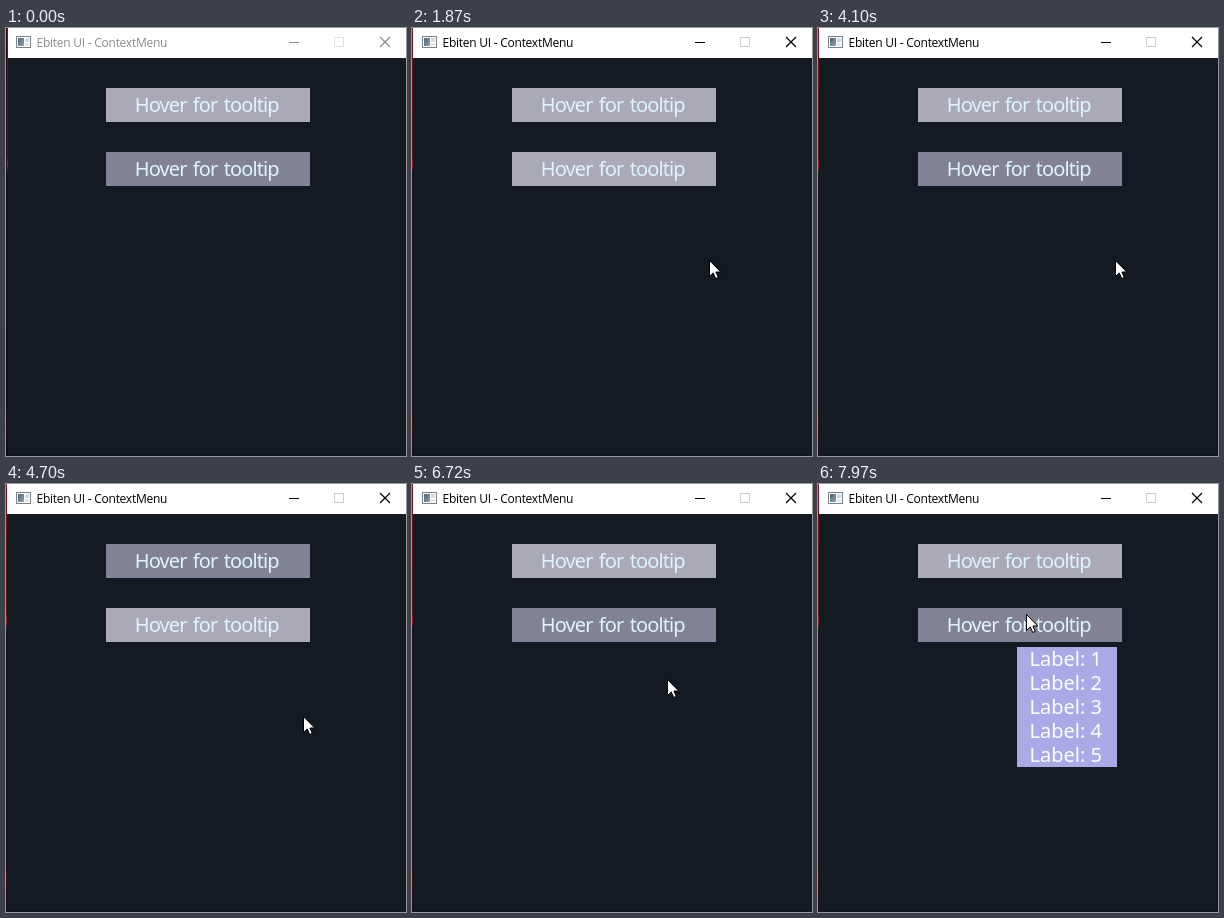
An HTML page for the animation above (7.99 s loop, 400 px wide and 428 px high).

```html
<!DOCTYPE html>
<html lang="en">
<head>
<meta charset="utf-8">
<title>Context menu</title>
<style>
  html, body { margin: 0; width: 100%; height: 100%; overflow: hidden; background: #131a22; }
  svg { display: block; width: 400px; height: 428px; }
  text { white-space: pre; }
  .title { font: 12px "Open Sans", sans-serif; letter-spacing: -.25px; }
  .button, .tip { font: 500 20px "Noto Sans", sans-serif; }
  .button { fill: #dff4ff; letter-spacing: -.9px; word-spacing: 2px; }
  .tip { fill: #fff; }
</style>
</head>
<body>
<svg viewBox="0 0 400 428">
  <defs>
    <linearGradient id="edge" x2="0" y2="1">
      <stop offset="0" stop-color="#7c0c18"/>
      <stop offset=".3" stop-color="#6a0a14"/>
      <stop offset=".32" stop-color="#98202c"/>
      <stop offset=".34" stop-color="#1c1416"/>
      <stop offset=".88" stop-color="#1a1214"/>
      <stop offset=".92" stop-color="#4c0a12"/>
      <stop offset="1" stop-color="#120c10"/>
    </linearGradient>
    <linearGradient id="panel" x2="1" y2="1">
      <stop offset="0" stop-color="#4a6478"/>
      <stop offset="1" stop-color="#8fa5b3"/>
    </linearGradient>
  </defs>

  <rect width="400" height="428" fill="#131a22"/>
  <rect width="2" height="428" fill="url(#edge)"/>
  <rect id="edgeShade" width="1" height="428" fill="#08060a" opacity=".6"/>
  <g id="activeFrame">
    <rect width="1" height="428" fill="url(#edge)"/>
    <rect x="1" width="1" height="428" fill="#131a22"/>
    <rect x="1" width="1" height="30" fill="#fff"/>
  </g>
  <rect x="2" y="427" width="398" height="1" fill="#0e131c"/>
  <rect x="2" width="398" height="30" fill="#fff"/>

  <g shape-rendering="crispEdges">
    <rect x="10.5" y="8.5" width="14" height="11" fill="#fff" stroke="#7b8287"/>
    <rect x="12" y="10" width="6" height="8" fill="url(#panel)"/>
    <rect x="19" y="10" width="4" height="4" fill="#d5dade"/>
    <rect x="19" y="15" width="4" height="3" fill="#e3e7e9"/>
  </g>
  <g id="titleBar">
    <text class="title" x="30.5" y="19" fill="currentColor">Ebiten UI - ContextMenu</text>
    <path d="M283 14.5h10" stroke="currentColor" shape-rendering="crispEdges"/>
    <path d="M374 9l10 10M384 9l-10 10" stroke="currentColor" stroke-width="1.2"/>
  </g>
  <rect id="maximize" x="328.5" y="9.5" width="9" height="9" fill="none" shape-rendering="crispEdges"/>

  <rect id="topButton" x="100" y="60" width="204" height="34"/>
  <text class="button" x="128.8" y="84">Hover for tooltip</text>
  <rect id="bottomButton" x="100" y="124" width="204" height="34"/>
  <text class="button" x="128.8" y="148">Hover for tooltip</text>

  <g id="tooltip">
    <rect x="199" y="163" width="100" height="120" fill="#aaaae6"/>
    <text class="tip" x="211.5" y="182">Label: 1</text>
    <text class="tip" x="211.5" y="206">Label: 2</text>
    <text class="tip" x="211.5" y="230">Label: 3</text>
    <text class="tip" x="211.5" y="254">Label: 4</text>
    <text class="tip" x="211.5" y="278">Label: 5</text>
  </g>

  <path id="cursor" d="M.5-.5v16l3.7-3.6 2.5 5.6 2.6-1.1-2.4-5.4h4.8z"
        fill="#fff" stroke="#000"/>
</svg>
<script>
const DURATION = 7990;
const ENTER = 560, ACTIVATE = 1740, TOOLTIP = 7050;
const IDLE = '#aaaab4', FOCUSED = '#828296';

// Keyboard focus: [start time, focused button]
const focusSteps = [
  [0, 'bottom'], [1800, 'none'], [3340, 'top'],
  [4100, 'bottom'], [4700, 'top'], [5790, 'bottom']
];

// Pointer tip: [time, x, y]
const pointerPath = [
  [540, 384, 416], [640, 340, 312], [720, 304, 226], [800, 287, 187],
  [880, 290, 208], [980, 297, 233],
  [6390, 297, 233], [6530, 285, 222], [6800, 243, 185], [6960, 220, 163],
  [7070, 211, 153], [7190, 213, 146],
  [7200, 213, 146], [7380, 220, 136],
  [7890, 220, 136], [7970, 208, 131]
];

const el = id => document.getElementById(id);
const show = (id, on) => el(id).style.display = on ? '' : 'none';

function pointerAt(t) {
  const next = pointerPath.findIndex(p => p[0] > t);
  if (next < 0) return pointerPath.at(-1).slice(1);
  if (next === 0) return pointerPath[0].slice(1);
  const [t0, x0, y0] = pointerPath[next - 1];
  const [t1, x1, y1] = pointerPath[next];
  const k = (t - t0) / (t1 - t0);
  return [Math.round(x0 + (x1 - x0) * k), Math.round(y0 + (y1 - y0) * k)];
}

function render(t) {
  const active = t >= ACTIVATE;
  const focus = focusSteps.findLast(step => t >= step[0])[1];
  el('titleBar').setAttribute('color', active ? '#000' : '#8c8c8c');
  el('maximize').setAttribute('stroke', active ? '#ccc' : '#e2e2e2');
  el('topButton').setAttribute('fill', focus === 'top' ? FOCUSED : IDLE);
  el('bottomButton').setAttribute('fill', focus === 'bottom' ? FOCUSED : IDLE);
  show('activeFrame', active);
  show('tooltip', t >= TOOLTIP);
  show('cursor', t >= ENTER);
  el('cursor').setAttribute('transform', `translate(${pointerAt(t)})`);
}

const start = performance.now();
function tick() {
  render((performance.now() - start) % DURATION);
  requestAnimationFrame(tick);
}
tick();
</script>
</body>
</html>
```
